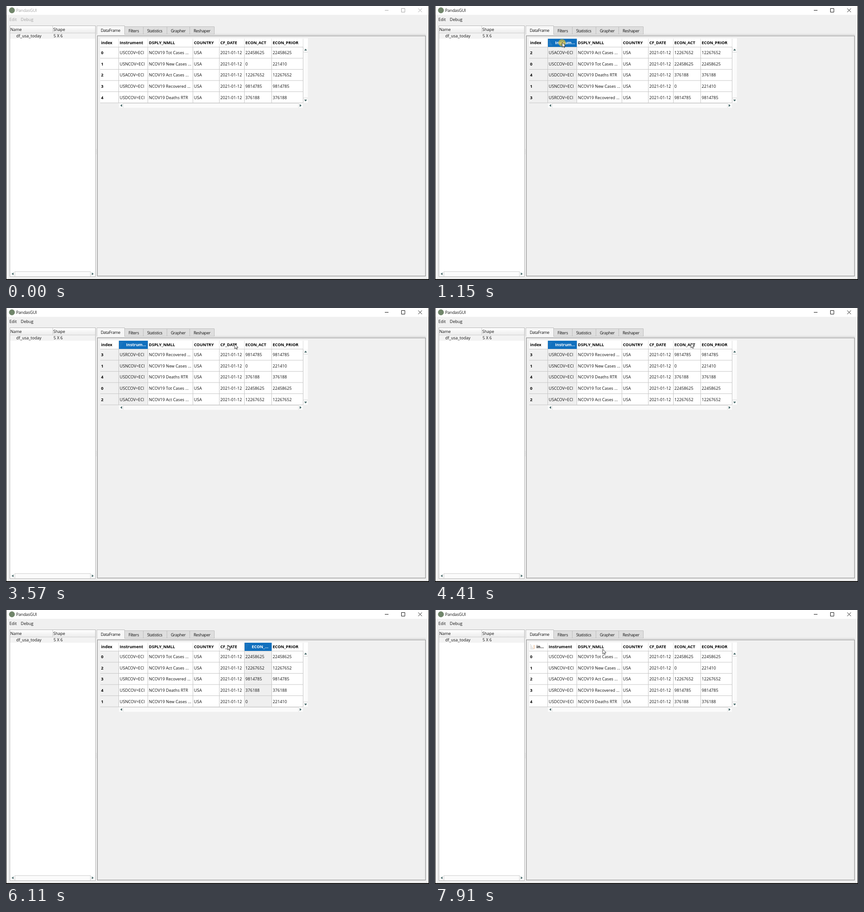
An HTML page that plays this animation: 929x603 px, repeating every 7.99 s.

```html
<!DOCTYPE html>
<html lang="en">
<head>
<meta charset="utf-8">
<title>PandasGUI</title>
<style>
html, body { margin: 0; width: 100%; height: 100%; overflow: hidden; background: #f0f0f0; }
svg { display: block; width: 929px; height: 603px; }
text { font: 9px "Open Sans", "Noto Sans", sans-serif; fill: #111; white-space: pre; }
.b { font-weight: 700; fill: #000; }
.tab { letter-spacing: -.35px; }
.cell { letter-spacing: .05px; }
.chrome text { fill: var(--ink); }
.chrome path { stroke: var(--ink); fill: none; }
.arrow { fill: #456767; }
</style>
</head>
<body>
<svg viewBox="0 0 929 603">
  <defs>
    <linearGradient id="head" x2="0" y2="1">
      <stop stop-color="#fff"/>
      <stop offset="1" stop-color="#ececec"/>
    </linearGradient>
  </defs>
  <rect width="929" height="603" fill="#f0f0f0"/>
  <rect width="929" height="19.5" fill="#fff"/>
  <g class="chrome" id="chrome">
    <text x="22.3" y="13" letter-spacing="-.1">PandasGUI</text>
    <text x="7.6" y="32.8">Edit</text>
    <text x="32.6" y="32.8">Debug</text>
    <path d="M832 9.5h8M868.5 5.5h7.5v8h-7.5zM905.5 5.5l8 8m0-8l-8 8"/>
  </g>
  <circle cx="13" cy="9.5" r="6.4" fill="#71866b"/>

  <!-- left tree -->
  <rect x="8.5" y="43.5" width="188" height="552" fill="#fff" stroke="#b4b4b4"/>
  <rect x="9" y="44" width="187" height="15.5" fill="url(#head)"/>
  <rect x="9" y="60" width="187" height="12" fill="#f3f3f3"/>
  <path d="M9 59.5H196M102.5 44V59" stroke="#cfcfcf"/>
  <text x="9.4" y="55.2">Name</text>
  <text x="103.8" y="55.2">Shape</text>
  <text x="22.6" y="69.3">df_usa_today</text>
  <text x="104.5" y="69.3">5 X 6</text>
  <path d="M198.5 315v11" stroke="#d2d2d2" stroke-dasharray="1 1"/>

  <!-- tabs and pane -->
  <path d="M457 62.5H922" stroke="#c9c9c9"/>
  <g id="tabs"></g>
  <rect x="200.5" y="65.5" width="721" height="529" fill="none" stroke="#929292"/>
  <rect x="201.5" y="66.5" width="719" height="527" fill="none" stroke="#d9d9d9"/>

  <!-- table -->
  <rect x="207" y="71" width="456" height="142" fill="#fff"/>
  <g id="bars"></g>
  <rect id="side" x="207" y="91" width="40.5" height="122" fill="#f0f0f0"/>
  <rect id="shade" y="91" height="122" fill="#efefef"/>
  <g id="grid"></g>
  <rect id="blue" y="72" height="18" fill="#1170be"/>
  <path id="icon" fill="none"/>
  <path id="mark" stroke="#e08a3c" fill="none"/>
  <g id="cells"></g>

  <path d="M.5 0V603M928.5 0V603" stroke="#111"/>
  <rect y="601" width="929" height="2" fill="#0a0a0a"/>
  <circle id="halo" r="8" fill="#ebc328" fill-opacity=".64"/>
  <path id="cursor" d="M.4 .2V10.8L2.9 8.6 4.5 12 6 11.3 4.5 8H7.8Z" fill="#fff" stroke="#111" stroke-width=".8"/>
</svg>
<script>
const LOOP = 7990;
const $ = id => document.getElementById(id);

function add(parent, tag, attrs, label = '') {
  const el = document.createElementNS('http://www.w3.org/2000/svg', tag);
  set(el, attrs);
  el.textContent = label;
  return parent.appendChild(el);
}
function set(el, attrs) {
  for (const k in attrs) el.setAttribute(k, attrs[k]);
}

const heads = ['index', 'Instrument', 'DSPLY_NMLL', 'COUNTRY', 'CF_DATE', 'ECON_ACT', 'ECON_PRIOR'];
const short = { 0: 'in...', 1: 'Instrum...', 5: 'ECON_...' };
const edges = [207, 247.5, 311.5, 410.5, 468.5, 523.5, 583.5, 652.5];
const rowH = 24.55;
const data = [
  ['USCCOV=ECI', 'NCOV19 Tot Cases ...', '22458625', '22458625'],
  ['USNCOV=ECI', 'NCOV19 New Cases ...', '0', '221410'],
  ['USACOV=ECI', 'NCOV19 Act Cases ...', '12267652', '12267652'],
  ['USRCOV=ECI', 'NCOV19 Recovered ...', '9814785', '9814785'],
  ['USDCOV=ECI', 'NCOV19 Deaths RTR', '376188', '376188']
].map(([code, name, act, prior], i) => [i, code, name, 'USA', '2021-01-12', act, prior]);

// Tabs
const tabEdges = [199.5, 260.5, 301.5, 353.5, 403.5, 457.5];
['DataFrame', 'Filters', 'Statistics', 'Grapher', 'Reshaper'].forEach((name, i) => {
  const x = tabEdges[i], top = i ? 45.5 : 43.5;
  add($('tabs'), 'path', {
    d: `M${x} 62.5V${top}H${tabEdges[i + 1]}V62.5${i ? 'z' : ''}`,
    fill: i ? '#dedede' : '#f7f7f7', stroke: '#bdbdbd'
  });
  add($('tabs'), 'text', { x: x + 8.4, y: i ? 57.8 : 57.4, class: 'tab' }, name);
});

// Scroll bars: two arrow buttons around one handle
function bar(x, y, w, h, stroke) {
  const g = $('bars'), flat = w > h, b = flat ? h : w;
  add(g, 'rect', { x, y, width: w, height: h, fill: '#fbfbfb' });
  add(g, 'path', {
    d: flat ? `M${x + b - .5} ${y}v${h}M${x + w - b + .5} ${y}v${h}M${x + b} ${y + .5}h${w - 2 * b}`
            : `M${x} ${y + b + .5}h${w}M${x} ${y + h - b - .5}h${w}`,
    stroke
  });
  const tri = (cx, cy, turn) => add(g, 'path', {
    d: 'M-2-3L2 0L-2 3z', class: 'arrow', transform: `translate(${cx} ${cy}) rotate(${turn})`
  });
  const r = b / 2, turn = flat ? 0 : 90;
  tri(x + r, y + r, turn + 180);
  tri(x + w - r, y + h - r, turn);
}
bar(9, 584, 187, 11, '#cdcdcd');
bar(248, 214, 404, 10, '#e0e0e0');
bar(653, 91, 10, 122, '#d4d4d4');

// Grid and cell texts
const grid = $('grid');
for (let i = 0; i < 6; i++) add(grid, 'path', { d: `M207 ${90.4 + rowH * i}H652.5`, stroke: '#c6c6c6' });
edges.slice(1).forEach(x => {
  add(grid, 'path', { d: `M${x} 72V90`, stroke: '#dcdcdc' });
  add(grid, 'path', { d: `M${x} 90V213`, stroke: '#c6c6c6' });
});
const textX = c => edges[c] + (c ? 2.3 : 1.8);
const headText = heads.map((h, c) => add($('cells'), 'text', { x: textX(c), y: 84.2, class: 'b' }, h));
const cellText = data.map((_, r) =>
  heads.map((_, c) => add($('cells'), 'text', { x: textX(c), y: 106.3 + rowH * r, class: c ? 'cell' : 'b' })));

// time, sorted column, row order, descending, highlighted
const sorts = [
  [0, -1, '01234', 0, 0],
  [1150, 1, '20413', 0, 1],
  [2570, 1, '31402', 1, 1],
  [4560, 5, '14320', 0, 1],
  [5270, 5, '02341', 1, 1],
  [6890, 5, '02341', 1, 0],
  [6980, 0, '01234', 0, 0]
];
// start, end, x, y
const clicks = [
  [1150, 1240, 279, 81], [1640, 1710, 279, 81], [2570, 2720, 279, 81],
  [4560, 4640, 559, 77], [5270, 5350, 559, 77], [6890, 6980, 232, 77]
];
// first step, last step, step count, x, y, sag
const entry = [229, -10];
const moves = [
  [450, 850, 6, 278, 74, 0],
  [1000, 1000, 1, 278, 80, 0],
  [1150, 1150, 1, 279, 80, 0],
  [3180, 3570, 6, 502, 79, 8],
  [3880, 4030, 3, 577, 77, 0],
  [4260, 4490, 4, 559, 77, 0],
  [6110, 6110, 1, 486, 77, 0],
  [6200, 6810, 9, 232, 77, 6],
  [7530, 7910, 6, 368, 86, 5]
];

function cursorAt(t) {
  let [x, y] = entry;
  for (const [a, b, n, tx, ty, sag] of moves) {
    if (t < a) break;
    const gap = (b - a) / (n - 1 || 1);
    const k = gap ? Math.min(n, Math.floor((t - a) / gap + 1.06)) : n;
    const u = (1 - Math.cos(Math.PI * k / n)) / 2;
    x += (tx - x) * u;
    y += (ty - y) * u + sag * Math.sin(Math.PI * u);
  }
  return [x, y];
}

function showSort([, col, order, desc, lit]) {
  headText.forEach((el, c) => {
    el.textContent = c === col ? short[c] : heads[c];
    el.setAttribute('x', textX(c) + (c === col ? 14 : 0));
    el.style.fill = c === col && lit ? '#fff' : '';
  });
  cellText.forEach((row, r) => row.forEach((el, c) => { el.textContent = data[order[r]][c]; }));

  const x = lit ? edges[col] + .5 : 0, width = lit ? edges[col + 1] - edges[col] - .5 : 0;
  set($('blue'), { x, width });
  set($('shade'), { x, width: Math.max(0, width - .5) });
  $('side').style.display = lit ? '' : 'none';

  const ix = col < 0 ? 0 : textX(col) + .3;
  const strokes = [0, 1, 2, 3].map(i => `M${ix} ${76.5 + i * 3}h${2 + 1.8 * (desc ? 3 - i : i)}`);
  set($('icon'), {
    d: col < 0 ? '' : strokes.join(''),
    stroke: lit ? (desc ? '#2f82c6' : '#5b9dd3') : '#a9a9a9', 'stroke-width': .8
  });
  set($('mark'), { d: col === 0 ? `M${ix + 8.5} 77v9` : '', 'stroke-width': .8 });
}

let shown;
function draw(now) {
  const t = now % LOOP;
  const sort = sorts.findLast(s => s[0] <= t);
  if (sort !== shown) showSort(shown = sort);
  $('chrome').style.setProperty('--ink', t < 1150 ? '#a3a3a3' : '#111');

  const click = clicks.find(c => t >= c[0] && t < c[1]);
  $('halo').style.display = click ? '' : 'none';
  if (click) set($('halo'), { cx: click[2], cy: click[3] });

  $('cursor').style.display = t < 450 ? 'none' : '';
  $('cursor').setAttribute('transform', `translate(${cursorAt(t)})`);
}

const start = performance.now();
function tick() {
  draw(performance.now() - start);
  requestAnimationFrame(tick);
}
tick();
</script>
</body>
</html>
```
